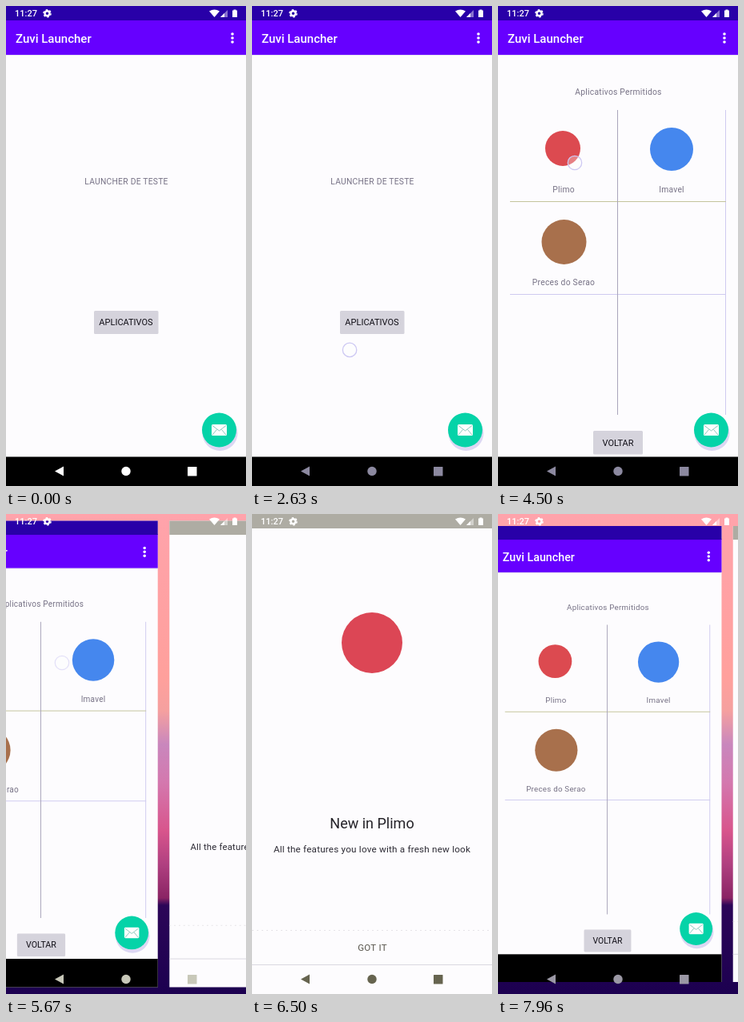
Animation, 300 px wide and 600 px high, one loop 8000 ms. Source, as an HTML page:

```html
<!DOCTYPE html>
<html lang="pt">
<head>
<meta charset="utf-8">
<style>
  html, body { margin: 0; width: 100%; height: 100%; overflow: hidden; background: #1c0050; }
  svg { display: block; width: 300px; height: 600px; font-family: Roboto, sans-serif; }
  .mid { text-anchor: middle; }
  .label { font-size: 10.3px; letter-spacing: .25px; fill: #777286; }
  .button { font-size: 11px; fill: #100e16; }
</style>
</head>
<body>
<svg viewBox="0 0 300 600">
  <defs>
    <linearGradient id="sky" x1="0" y1="0" x2="0" y2="1">
      <stop offset="0" stop-color="#ffa3ab"/>
      <stop offset=".34" stop-color="#ffa09c"/>
      <stop offset=".41" stop-color="#f5a09f"/>
      <stop offset=".48" stop-color="#c987bd"/>
      <stop offset=".56" stop-color="#d478ae"/>
      <stop offset=".66" stop-color="#d8558c"/>
      <stop offset=".73" stop-color="#b04080"/>
      <stop offset=".8" stop-color="#8a2464"/>
      <stop offset=".815" stop-color="#2c0658"/>
      <stop offset="1" stop-color="#1c0050"/>
    </linearGradient>
  </defs>
  <rect width="300" height="600" fill="url(#sky)"/>

  <g id="launcher">
    <rect width="300" height="600" fill="#fdfcfe"/>
    <rect y="17" width="300" height="44" fill="#6600ff"/>
    <rect width="300" height="18" fill="#2800a8"/>
    <rect y="61" width="300" height="1" fill="#e4dff2"/>
    <rect y="563.5" width="300" height="36.5" fill="#000"/>
    <text x="12" y="46" font-size="15" font-weight="500" fill="#fff">Zuvi Launcher</text>
    <g fill="#fff">
      <circle cx="283" cy="35" r="1.8"/><circle cx="283" cy="40" r="1.8"/><circle cx="283" cy="45" r="1.8"/>
    </g>

    <g id="home" class="mid">
      <text class="label" x="150.5" y="223">LAUNCHER DE TESTE</text>
      <rect x="110" y="381" width="80.5" height="29" rx="1.5" fill="#d5d3dc"/>
      <text class="button" x="150" y="399">APLICATIVOS</text>
    </g>

    <g id="apps" class="mid">
      <text class="label" x="150.5" y="111">Aplicativos Permitidos</text>
      <g fill="none">
        <path d="M284.5 130V511M15 360.5H285" stroke="#cfcbf0"/>
        <path d="M15 244.5H285" stroke="#c4c49c"/>
        <path d="M149.5 130V511" stroke="#aaa6bc"/>
      </g>
      <circle cx="81" cy="178" r="22" fill="#dc4a50"/>
      <circle cx="217" cy="179" r="27" fill="#4587ee"/>
      <circle cx="82.5" cy="295" r="28" fill="#a8704c"/>
      <text class="label" x="82" y="233">Plimo</text>
      <text class="label" x="217" y="233">Imavel</text>
      <text class="label" x="82" y="349">Preces do Serao</text>
      <rect x="119" y="531" width="62" height="29.5" rx="1.5" fill="#d5d3dc"/>
      <text class="button" x="150" y="549.5">VOLTAR</text>
    </g>

    <circle cx="267.5" cy="534" r="22" fill="#dcd7f3"/>
    <circle cx="266.5" cy="530" r="21.5" fill="#05d3a8"/>
    <rect x="257" y="523" width="19" height="14" rx="1.5" fill="#fff"/>
    <path d="M258 524.5L266.5 531L275 524.5M258 536L263.5 529.5M275 536L269.5 529.5" fill="none" stroke="#8cc9bd"/>
  </g>

  <g id="mail">
    <rect width="300" height="600" fill="#fdfcfe"/>
    <rect width="300" height="18" fill="#aeaca3"/>
    <circle cx="150" cy="161" r="38" fill="#dc4655"/>
    <g class="mid">
      <text x="150" y="393" font-size="18" fill="#242228">New in Plimo</text>
      <text x="150" y="423" font-size="11.7" letter-spacing=".2" fill="#2c2a34">All the features you love with a fresh new look</text>
      <text x="150.5" y="546" font-size="11.5" letter-spacing=".3" fill="#56534a">GOT IT</text>
    </g>
    <path d="M0 520.5H300" stroke="#e6e4e8" stroke-dasharray="2 4"/>
    <path d="M0 563.5H300" stroke="#dad8e0"/>
  </g>

  <g fill="#fff">
    <text x="11" y="13" font-size="11" font-weight="500">11:27</text>
    <circle cx="51.5" cy="9.3" r="3" fill="none" stroke="#fff" stroke-width="2.4"/>
    <circle cx="51.5" cy="9.3" r="4.6" fill="none" stroke="#fff" stroke-width="1.4" stroke-dasharray="2.41 2.41"/>
    <path d="M254 6.5Q260.5 2.5 267 6.5L260.5 14Z"/>
    <path d="M268 14L277 5V14Z" opacity=".45"/>
    <path d="M268 14L273 9V14Z"/>
    <path d="M283 5.5H284.5V4.5H287.5V5.5H289V14H283Z"/>
  </g>
  <g id="nav">
    <path d="M61 581.5L72 575.5V587.5Z"/>
    <circle cx="150" cy="581.5" r="5.7"/>
    <rect x="227" y="576" width="11.5" height="11.5" rx=".5"/>
  </g>
  <circle id="touch" r="8.7" fill="#fff" fill-opacity=".3" stroke="#cdc8f3" stroke-width="1.3"/>
</svg>

<script>
const LOOP = 8000;
const APPS_AT = 3200;
const OPEN_AT = 5564;
const BACK_AT = 7652;
const SWITCH_MS = 600;

const [launcher, mail, home, apps, nav, touch] =
  ['launcher', 'mail', 'home', 'apps', 'nav', 'touch'].map(id => document.getElementById(id));

const clamp = v => Math.min(1, Math.max(0, v));

// Bezier easing from (0,0) to (1,1) with control points (x1,0) and (x2,1).
const ease = (x1, x2) => x => {
  x = clamp(x);
  let lo = 0, hi = 1;
  for (let i = 0; i < 24; i++) {
    const p = (lo + hi) / 2;
    const at = 3 * p * (1 - p) ** 2 * x1 + 3 * p * p * (1 - p) * x2 + p ** 3;
    if (at < x) lo = p; else hi = p;
  }
  return lo * lo * (3 - 2 * lo);
};
const slideEase = ease(0.2, 0);
const scaleEase = ease(0.4, 0.2);

// Each key is [time, ...values]; values are interpolated linearly.
function track(keys, t) {
  const next = keys.findIndex(key => key[0] > t);
  if (next < 0) return keys[keys.length - 1].slice(1);
  if (next === 0) return keys[0].slice(1);
  const a = keys[next - 1], b = keys[next];
  const p = (t - a[0]) / (b[0] - a[0]);
  return a.slice(1).map((v, i) => v + (b[i + 1] - v) * p);
}

const navColor = [
  [0, 255, 255, 255], [2630, 140, 137, 160], [5562, 140, 137, 160],
  [5660, 200, 200, 185], [5800, 200, 200, 185], [6100, 102, 100, 79],
  [7700, 102, 100, 79], [7850, 155, 152, 165]
];
// x, y, opacity
const touchPath = [
  [2450, 112, 442, 0], [2600, 121, 431, 1], [2630, 122, 430, 1],
  [2950, 145, 399, 1], [3500, 145, 399, 1], [4300, 98, 200, 1],
  [4500, 96, 196, 1], [5150, 70, 186, 1], [5500, 70, 186, 1], [5850, 70, 186, 0]
];

function place(card, shift, scale) {
  card.setAttribute('transform',
    `translate(150 300) scale(${scale}) translate(${shift * 315 - 150} -300)`);
  card.style.display = Math.abs(shift) < 0.999 ? '' : 'none';
}

function draw(t) {
  const showApps = t >= APPS_AT;
  home.style.display = showApps ? 'none' : '';
  apps.style.display = showApps ? '' : 'none';

  // The cards shrink, slide past each other, then grow back.
  const opening = t < BACK_AT;
  const elapsed = Math.min(SWITCH_MS, Math.max(0, t - (opening ? OPEN_AT : BACK_AT)));
  const slide = slideEase((elapsed - 50) / 383);
  const scale = 1 - 0.05 * (scaleEase(elapsed / 283) - scaleEase((elapsed - 317) / 283));
  const mailShown = opening ? slide : 1 - slide;
  place(launcher, -mailShown, scale);
  place(mail, 1 - mailShown, scale);

  nav.setAttribute('fill', `rgb(${track(navColor, t).map(Math.round)})`);
  const [x, y, opacity] = track(touchPath, t);
  touch.setAttribute('transform', `translate(${x} ${y})`);
  touch.setAttribute('opacity', opacity);
}

const start = performance.now();
function frame() {
  draw((performance.now() - start) % LOOP);
  requestAnimationFrame(frame);
}
frame();
</script>
</body>
</html>
```
